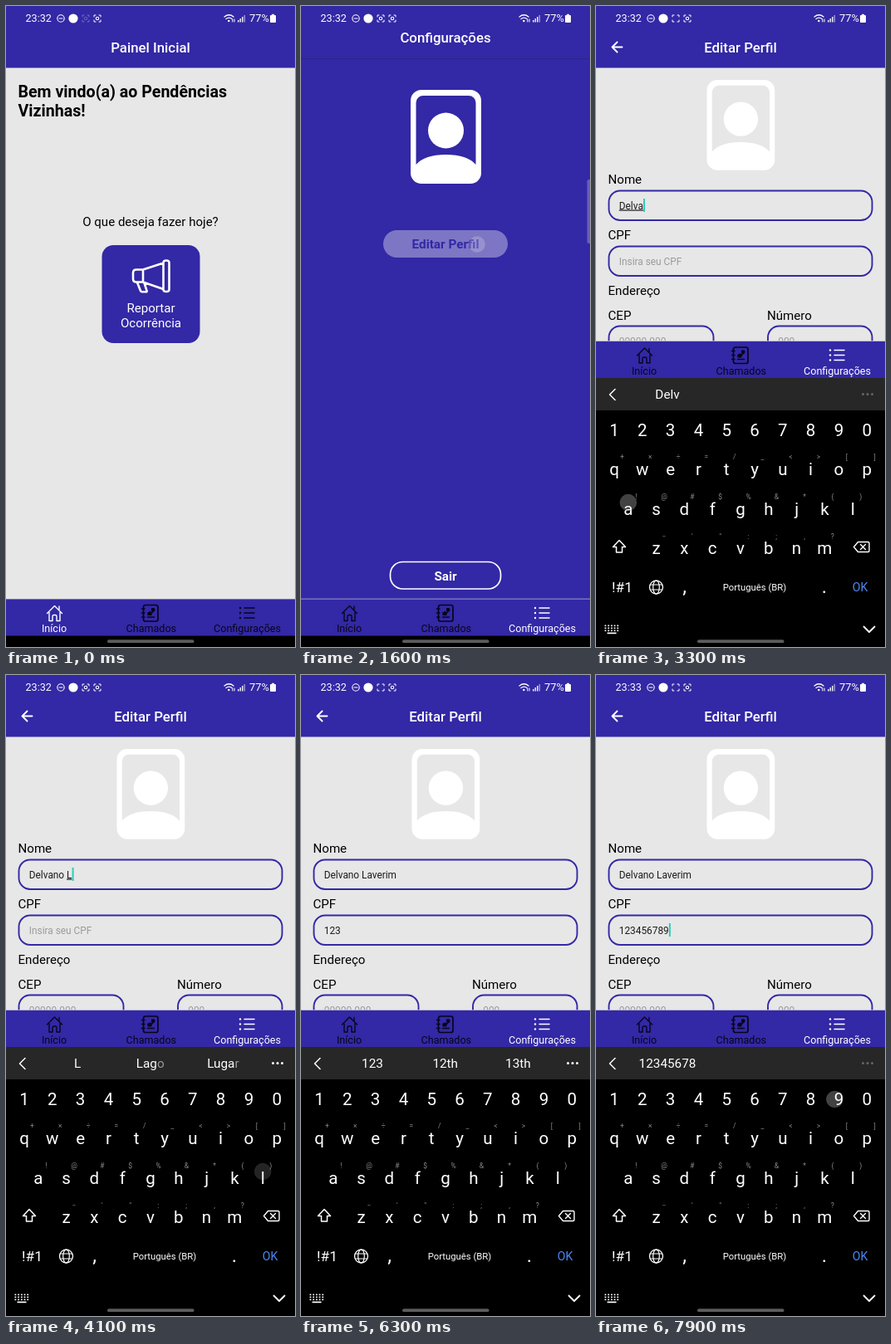
Write an HTML page that moves like this. It is 348 by 772 pixels and loops after 8000 ms.

```html
<!DOCTYPE html>
<html lang="pt-BR">
<head>
<meta charset="utf-8">
<title>Editar Perfil</title>
<style>
html, body { margin: 0; width: 100%; height: 100%; overflow: hidden; background: #000; }
svg { display: block; width: 100vw; height: 100vh; font-family: Roboto, sans-serif; }
text { white-space: pre; }
</style>
</head>
<body>
<svg id="stage" viewBox="0 0 348 772"></svg>
<script>
const LOOP = 8000, STEP = 100;
const BLUE = '#3328a5', PAPER = '#e7e7e7', TEAL = '#25cdb8';
const MID = 'text-anchor="middle"';

// Key presses: [time, character]
const NAME_KEYS = [[2500, 'D'], [2700, 'e'], [2900, 'l'], [3100, 'v'], [3300, 'a'], [3500, 'n'],
  [3600, 'o'], [3800, ' '], [4000, 'L'], [4200, 'a'], [4300, 'v'], [4400, 'e'], [4500, 'r'],
  [4600, 'i'], [4700, 'm']];
const CPF_KEYS = [[5500, '1'], [5800, '2'], [6000, '3'], [6500, '4'], [6700, '5'], [6900, '6'],
  [7200, '7'], [7500, '8'], [7900, '9']];
const CPF_FOCUS = 5000;
// Taps outside the keyboard: [from, to, x, y]
const TAPS = [[100, 300, 300, 732], [1300, 1700, 212, 287], [2000, 2200, 150, 240], [4900, 5000, 197, 302]];
const SLIDE = [[0, 324], [2100, 190], [2200, 45], [2300, 0]];
const CAST_DOT = [[0, .25], [300, 1], [1100, 0], [1300, 1], [2100, 0], [2600, 1], [3100, 0], [3600, 1],
  [4300, 0], [5100, 1], [5500, 0], [5800, 1], [6200, 0], [6700, 1], [7400, 0]];
const OPTIONS = { L: ['Lag<tspan fill="#999">o</tspan>', 'Luga<tspan fill="#999">r</tspan>'], 123: ['12th', '13th'] };

const ROWS = [
  { keys: '1234567890', x: 22, y: 518, low: 518 },
  { keys: 'QWERTYUIOP', x: 22, y: 567.5, low: 564.5, hints: '+×÷=/_<>[]' },
  { keys: 'ASDFGHJKL', x: 38.8, y: 615.5, low: 612.5, hints: '!@#$%&*()' },
  { keys: 'ZXCVBNM', x: 72.5, y: 663.5, low: 660, hints: "−'\":;,?" }
];
const GAP = 33.8;

const esc = s => s.replace(/&/g, '&amp;').replace(/</g, '&lt;');
const text = (x, y, size, s, attr = '') => `<text x="${x}" y="${y}" font-size="${size}" ${attr}>${s}</text>`;
const rect = (x, y, w, h, attr = '') => `<rect x="${x}" y="${y}" width="${w}" height="${h}" ${attr}/>`;
const circle = (x, y, r, attr = '') => `<circle cx="${x}" cy="${y}" r="${r}" ${attr}/>`;
const group = (attr, ...parts) => `<g ${attr}>${parts.join('')}</g>`;
const line = (d, color, width, attr = '') =>
  `<path d="${d}" fill="none" stroke="${color}" stroke-width="${width}" stroke-linecap="round" stroke-linejoin="round" ${attr}/>`;
const at = (table, t) => table.reduce((v, [time, value]) => t >= time ? value : v, table[0][1]);
const typed = (keys, t) => keys.filter(k => k[0] <= t).map(k => k[1]).join('');

const pen = document.createElement('canvas').getContext('2d');
const widthOf = s => { pen.font = '11.85px Roboto, sans-serif'; return pen.measureText(s).width; };

function statusBar(t) {
  const corners = x => line(`M${x - 4} 13V11h2M${x + 2} 11h2v2M${x + 4} 17v2h-2M${x - 2} 19h-2v-2`, '#fff', 1);
  const dot = (x, o) => circle(x, 15, 1.7, `fill="none" stroke="#fff" stroke-width="1.1" opacity="${o}"`);
  const first = at(CAST_DOT, t);
  const bars = [0, 1, 2, 3].map(i => rect(279 + i * 2.5, 17 - i * 2, 1.5, 2.5 + i * 2, `fill="#fff" opacity="${i > 2 ? .5 : .9}"`));
  return group('fill="#fff"',
    text(23.5, 19.3, 12.6, t < 7400 ? '23:32' : '23:33'),
    circle(66, 15, 4.2, 'fill="none" stroke="#fff" stroke-width="1.1"'), line('M64 15h4', '#fff', 1.1),
    circle(81, 15, 5.6),
    group(`opacity="${t < 300 ? .3 : 1}"`, corners(96)), dot(96, first), corners(110), dot(110, 1),
    line('M263 13q5.500-4.500 11 0M265 15.500q3.500-2.800 7 0', '#fff', 1.3),
    circle(268.3, 18, 1.2), line('M272.800 19v-3M275 16v3', '#fff', 1),
    ...bars, text(293, 19.3, 12.8, '77%'),
    rect(318, 11, 7, 9, 'rx="1"'), rect(320, 9.8, 3, 2));
}

const header = title => rect(0, 0, 348, 74.5, `fill="${BLUE}"`) +
  text(174, 55.5, 16.8, title, `${MID} fill="#fff" font-weight="500"`);

const avatar = transform => group(`transform="${transform}" fill="#fff"`,
  `<path fill-rule="evenodd" d="M13 0H72a13 13 0 0 1 13 13V100a13 13 0 0 1-13 13H13a13 13 0 0 1-13-13V13a13 13 0 0 1 13-13z
    M15 7a8.500 8.500 0 0 0-8.500 8.500V90Q17 78 42.500 78T78.500 90V15.500a8.500 8.500 0 0 0-8.500-8.500z"/>`,
  circle(42.5, 49, 21.5));

function homePage() {
  const horn = 'M165 317.500L189.500 309.500M165 332.500L189.500 341M165 317.500h-8q-4 0-4 4v7q0 4 4 4h8z' +
    'M189.500 309q0-2.500 3.500-2.500t3.500 2.500v32.500q0 2.500-3.500 2.500t-3.500-2.500z' +
    'M158 333l4 10q.5 1.300 2 1.300h4.500q1.500 0 1-1.500l-3-9.300';
  return rect(0, 0, 348, 772, `fill="${PAPER}"`) + header('Painel Inicial') +
    text(14.5, 110, 19.6, 'Bem vindo(a) ao Pendências', 'font-weight="700"') +
    text(14.5, 133, 19.6, 'Vizinhas!', 'font-weight="700"') +
    text(174, 265, 15.05, 'O que deseja fazer hoje?', MID) +
    rect(115.5, 288, 118, 118, `rx="14" fill="${BLUE}"`) + line(horn, '#fff', 2.6) +
    text(174.5, 369, 15.1, 'Reportar', `${MID} fill="#fff"`) +
    text(174.5, 387, 15.1, 'Ocorrência', `${MID} fill="#fff"`);
}

function settingsPage(t) {
  return rect(0, 0, 348, 772, `fill="${BLUE}"`) +
    rect(0, 63, 348, .8, 'fill="#000" opacity=".16"') +
    text(174, 43.5, 16.8, 'Configurações', `${MID} fill="#fff" font-weight="500"`) +
    avatar('translate(132 101)') +
    group(`opacity="${t < 1500 ? 1 : .36}"`,
      rect(99, 270, 150, 33, 'rx="16.5" fill="#fff"'),
      text(174, 292.3, 15.3, 'Editar Perfil', `${MID} fill="${BLUE}" font-weight="700"`)) +
    rect(107.5, 669.5, 133, 32.5, 'rx="15" fill="none" stroke="#fff" stroke-width="1.7"') +
    text(174, 691.5, 15.3, 'Sair', `${MID} fill="#fff" font-weight="700"`) +
    rect(344.5, 209, 6, 77, 'rx="2" fill="#fff" opacity=".25"');
}

function editPage(t) {
  const field = (x, y, w, hint, value = '', marked = value) =>
    rect(x + 1, y + 1, w - 2, 35.5, `rx="13.5" fill="none" stroke="${BLUE}" stroke-width="1.9"`) +
    text(x + 13.3, y + 23, 11.85, value ? marked : hint, `fill="${value ? '#1c1c1c' : '#9b9b9b'}"`);
  const label = (x, y, s) => text(x, y, 15.1, s);

  const name = typed(NAME_KEYS, t), cpf = typed(CPF_KEYS, t);
  const marked = t < CPF_FOCUS ? name.replace(/\S+$/, '<tspan text-decoration="underline">$&</tspan>') : name;
  const inName = t >= 2400 && t < 4800, inCpf = t >= CPF_FOCUS;
  let cursor = '';
  if (inName || inCpf) {
    const since = (inName ? [[2400], ...NAME_KEYS] : [[CPF_FOCUS], ...CPF_KEYS]).filter(k => k[0] <= t).pop()[0];
    if ((t - since) % 600 < 300)
      cursor = rect(28 + widthOf(inName ? name : cpf), inName ? 232 : 299, 1.9, 16, `fill="${TEAL}"`);
  }
  return rect(0, 0, 348, 772, `fill="${PAPER}"`) + header('Editar Perfil') +
    line('M31.500 49.500H20M25.500 43.500l-6 6 6 6', '#fff', 1.9) +
    avatar('translate(133.500 89) scale(.962)') +
    label(14.5, 214, 'Nome') + field(14.5, 221.5, 319, 'Nome Completo', name, marked) +
    label(14.5, 281, 'CPF') + field(14.5, 288.5, 319, 'Insira seu CPF', cpf) +
    label(14.5, 348, 'Endereço') +
    label(14.5, 377.5, 'CEP') + field(14.5, 384.5, 128, '00000-000') +
    label(206, 377.5, 'Número') + field(206, 384.5, 127.5, '000') + cursor;
}

function tabs(t) {
  const active = t < 300 ? 0 : 2;
  const color = i => i === active ? '#fff' : '#07051c';
  const label = (i, x, s) => text(x, 754.3, 12.55, s, `${MID} fill="${color(i)}"`);
  return group(`transform="translate(0 ${t < 2200 ? 0 : -310.5})"`,
    rect(0, 714, 348, 45, `fill="${BLUE}"`), rect(0, 713.7, 348, .8, 'fill="#d8d8d8" opacity=".8"'),
    line('M49.500 731.500L58.500 722.500L67.500 731.500M52 730.500V740.500H56V735q0-1.500 1.500-1.500h2q1.500 0 1.500 1.500V740.500H65V730.500M64 727v-4', color(0), 1.4),
    rect(165.5, 721.5, 17.5, 19.5, `rx="2.500" fill="none" stroke="${color(1)}" stroke-width="1.7"`),
    line('M163.500 726h3.500M163.500 731h3.500M163.500 736h3.500M170.500 736h8M171 731.500l2.500-2 2 1.500 3.500-4', color(1), 1.5),
    rect(170.5, 730, 5, 4, `fill="${color(1)}"`), rect(175, 725, 4, 4, `fill="${color(1)}"`),
    ...[725, 731, 737].map(y => circle(282, y, 1.2, `fill="${color(2)}"`) + line(`M287 ${y}h12`, color(2), 1.5)),
    label(0, 58, 'Início'), label(1, 174.8, 'Chamados'), label(2, 290.5, 'Configurações'));
}

function toolbar() {
  const ink = '#eee';
  const gear = [...Array(8)].map((_, i) => `<path d="M152.500 461v-1.500" transform="rotate(${i * 45} 152.500 467.500)" stroke="${ink}" stroke-width="2.500"/>`);
  return [31, 92, 152.5, 214, 275].map(x => circle(x, 467.5, 14.5, 'fill="#474747"')).join('') +
    circle(31, 467.5, 7, `fill="none" stroke="${ink}" stroke-width="1.300"`) +
    circle(28.5, 465.5, 1, `fill="${ink}"`) + circle(33.5, 465.5, 1, `fill="${ink}"`) +
    line('M27.500 469.500q3.500 3.500 7 0', ink, 1.2) +
    rect(89.3, 460, 5.4, 9.5, `rx="2.700" fill="none" stroke="${ink}" stroke-width="1.300"`) +
    line('M86.500 467q.5 5.500 5.500 5.500t5.500-5.500M92 472.500v2.500', ink, 1.3) +
    circle(152.5, 467.5, 5.8, `fill="none" stroke="${ink}" stroke-width="1.300"`) + gear.join('') +
    circle(152.5, 467.5, 2, `fill="none" stroke="${ink}" stroke-width="1.200"`) +
    line('M206 464v-2.500h10v2.500M211 461.500v12h-2.500M214 474l1-3.500 6-6.500 2.300 2.300-6 6.500z', ink, 1.4) +
    circle(273.7, 466, 5, `fill="none" stroke="${ink}" stroke-width="1.500"`) + line('M277.500 470l4 4', ink, 1.6);
}

function suggestions(word) {
  return line('M23 461.500l-6.500 6.500 6.500 6.500', '#fff', 1.5) +
    [word, ...(OPTIONS[word] || [])].map((s, i) => text(86 + i * 87.7, 473.3, 15.3, s, `${MID} fill="#fff"`)).join('');
}

function keyboard(t) {
  const read = time => time < CPF_FOCUS ? typed(NAME_KEYS, time) : typed(CPF_KEYS, time);
  const value = read(t), word = read(t - STEP).trim().split(' ').pop();
  const bare = !value || !word;
  const upper = !value || value.endsWith(' ');
  const dim = !bare && !OPTIONS[word];

  const keys = ROWS.map(({ keys, x, y, low, hints }) => [...keys].map((k, i) => {
    const cx = x + i * GAP;
    return text(cx, upper ? y : low, 20.5, upper ? k : k.toLowerCase(), MID) +
      (hints ? text(cx + 9.5, y - 21.5, 8.5, esc(hints[i]), `${MID} fill="#888"`) : '');
  }).join('')).join('');

  const dots = [0, 1, 2, 3, 4].flatMap(i => [0, 1, 2].map(j => rect(10.5 + i * 3.7, 745.5 + j * 3, 1.8, 1.6)));
  return group(`transform="translate(0 ${at(SLIDE, t)})" fill="#fff"`,
    rect(0, 448, 348, 324, 'fill="#000"'), rect(0, 448, 348, 39, 'fill="#272727"'),
    bare ? toolbar() : suggestions(word),
    ...[321.5, 327, 332.5].map(x => circle(x, 467.5, 1.5, `fill="${dim ? '#666' : '#fff'}"`)),
    keys,
    line('M28 643.500l7.500 8h-4v6.500h-7v-6.500h-4z', upper ? '#4c88f5' : '#fff', 1.5),
    line('M310.500 651.500l5-6h12q1.500 0 1.500 1.500v9q0 1.500-1.500 1.500h-12zM318.500 648.500l6 6M324.500 648.500l-6 6', '#fff', 1.4),
    text(31.5, 706, 17.3, '!#1', MID),
    circle(72.5, 700, 8, 'fill="none" stroke="#fff" stroke-width="1.300"'),
    '<ellipse cx="72.500" cy="700" rx="3.800" ry="8" fill="none" stroke="#fff" stroke-width="1.200"/>',
    line('M65.500 697h14M65.500 703h14', '#fff', 1.2),
    text(106.5, 707, 24, ',', MID), text(191, 703.8, 11.3, 'Português (BR)', MID),
    text(275, 707, 24, '.', MID), text(318, 705, 14.1, 'OK', `${MID} fill="#4c88f5"`),
    ...dots, rect(13.5, 754.5, 11, 1.7),
    line('M322.500 747.500l6.500 6.500 6.500-6.500', '#fff', 1.8));
}

// Touch spot for a typed character
function spot(c) {
  if (c === ' ') return [191, 694];
  const row = ROWS.find(r => r.keys.includes(c.toUpperCase()));
  const x = row.x + row.keys.indexOf(c.toUpperCase()) * GAP;
  return row === ROWS[0] ? [x - 5, 511] : [x, row.y - 17.5];
}

function touches(t) {
  const mark = (x, y, o) => circle(x, y, 10, `fill="#fff" fill-opacity="${o}" stroke="#777" stroke-opacity="${o}" stroke-width="1"`);
  return TAPS.filter(([from, to]) => t >= from && t < to)
      .map(([from, , x, y]) => mark(x, y, from === 4900 ? .6 : .2)).join('') +
    [...NAME_KEYS, ...CPF_KEYS].filter(([k]) => t >= k && t < k + 2 * STEP)
      .map(([k, c]) => mark(...spot(c), t === k ? .26 : .14)).join('');
}

function scene(t) {
  const page = t < 300 ? homePage() : t < 1800 ? settingsPage(t) : '';
  const edit = t < 1700 ? '' : group(`opacity="${t < 1800 ? .5 : 1}"`, editPage(t));
  return page + edit + statusBar(t) + tabs(t) + (t < 2100 ? '' : keyboard(t)) +
    rect(0, 758.5, 348, 13.5, 'fill="#000"') + rect(122, 763.3, 104.5, 3.8, 'rx="1.900" fill="#5c5c5c"') +
    touches(t);
}

const stage = document.getElementById('stage');
const start = performance.now();
let shown = -1;
function tick() {
  const t = Math.floor((performance.now() - start) % LOOP / STEP) * STEP;
  if (t !== shown) stage.innerHTML = scene(shown = t);
  requestAnimationFrame(tick);
}
tick();
</script>
</body>
</html>
```
